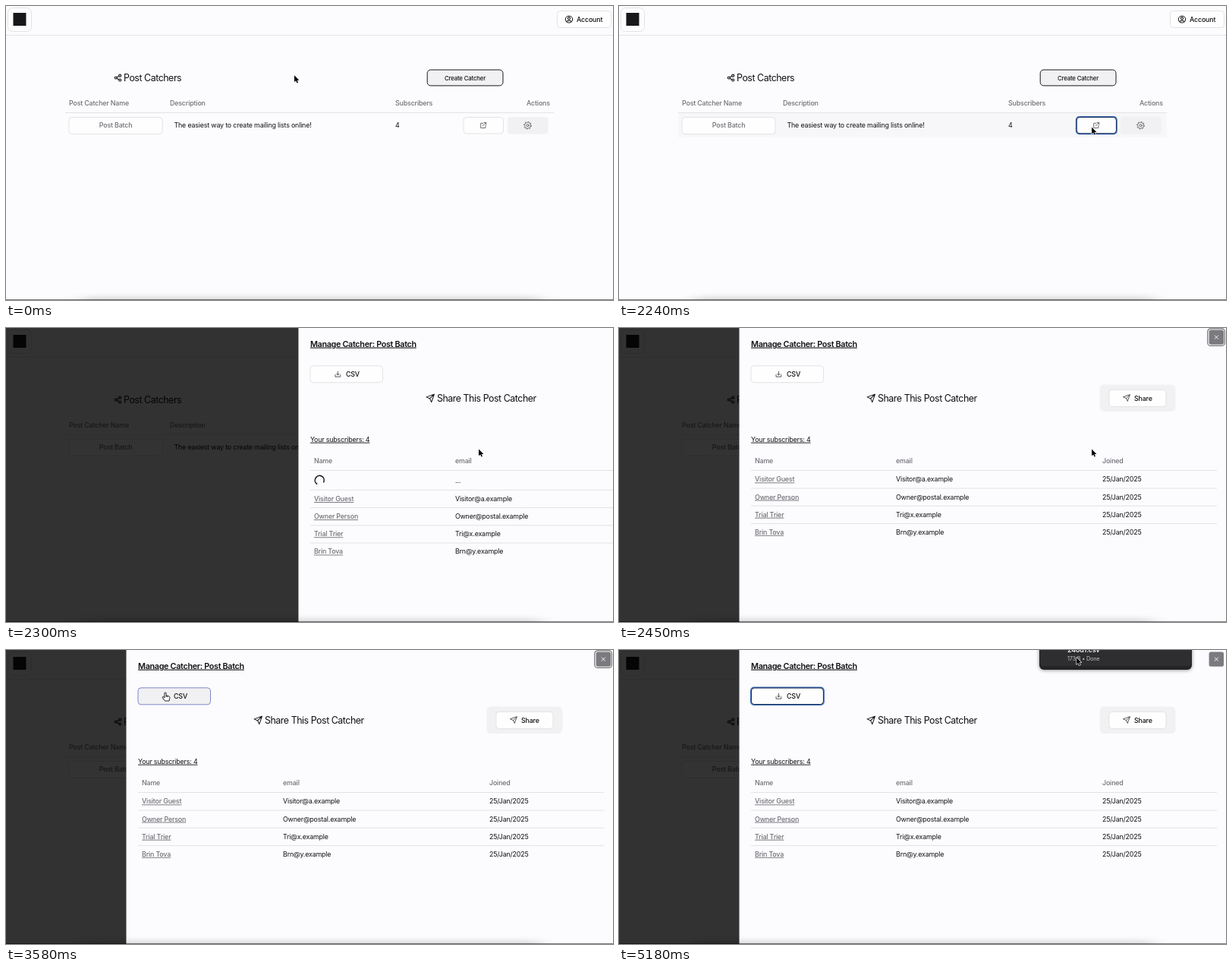
Write an HTML page that moves like this. It is 800 by 387 pixels and loops after 5210 ms.

```html
<!DOCTYPE html>
<html lang="en">
<head>
<meta charset="utf-8">
<title>Mailing list dashboard</title>
<style>
  html, body { margin: 0; width: 100%; height: 100%; overflow: hidden; background: #fcfbfd; }
  svg { display: block; width: 100%; height: 100%; }
  text { font: 440 8.9px Inter, "Noto Sans", sans-serif; letter-spacing: -.02em; fill: #111113; white-space: pre; }
  .m { font-weight: 500; }
  .g { font-weight: 500; fill: #6f6f76; }
  .u { text-decoration: underline; }
  .h { font-size: 12.4px; letter-spacing: -.037em; }
  .t { font-size: 10.8px; font-weight: 600; letter-spacing: -.03em; }
  .s { font-size: 7.8px; font-weight: 500; }
  .c { text-anchor: middle; }
  .file { font-size: 8.8px; font-weight: 600; fill: #f2f2f4; }
  .size { font-size: 7.2px; fill: #c4c4c9; }
  .i { fill: none; stroke: #18181b; stroke-linecap: round; stroke-linejoin: round; }
</style>
</head>
<body>
<svg id="stage" viewBox="0 0 800 387"></svg>
<script>
const LOOP = 5210, SHEET_X = 158.5, SHEET_W = 641.5;
const LINE = '#e3e2e6', PAGE = '#fcfbfd', SOFT = '#f1f0f2';

const text = (x, y, str, cls = '') => `<text x="${x}" y="${y}" class="${cls}">${str}</text>`;
const box = (x, y, w, h, fill, stroke = 'none', extra = '') =>
  `<rect x="${x}" y="${y}" width="${w}" height="${h}" rx="4" fill="${fill}" stroke="${stroke}" ${extra}/>`;
const rule = (x1, x2, y) => `<path d="M${x1} ${y}H${x2}" stroke="${LINE}"/>`;
const icon = (x, y, k, d, w = 2, color = '#18181b') =>
  `<path class="i" transform="translate(${x} ${y}) scale(${k})" d="${d}" stroke-width="${w}" style="stroke:${color}"/>`;
const ring = (id, x, y, w, h) => `<g id="${id}" fill="none">
  ${box(x - .5, y - .5, w + 1, h + 1, 'none', '#3a6cb8', 'stroke-width="1.4"')}
  ${box(x + .2, y + .2, w - .4, h - .4, 'none', '#14294f')}</g>`;

const PLANE = 'M22 2L15 22L11 13L2 9ZM22 2L11 13';
const EXPORT = 'M12 3V15M7.5 10.5L12 15L16.5 10.5M3.5 14V20.5H20.5V14';
const OPEN = 'M19 13V20.5H3.5V5H11M14 3H21V10M21 3L10 14';

function gear(cx, cy) {
  const pts = [];
  for (let k = 0; k < 32; k++) {
    const r = k % 4 < 2 ? 4.9 : 3.6, a = (k + .5) * Math.PI / 16;
    pts.push((cx + r * Math.cos(a)).toFixed(2) + ',' + (cy + r * Math.sin(a)).toFixed(2));
  }
  return `<g class="i" stroke-width=".8" style="stroke:#4c4c52"><polygon points="${pts.join(' ')}"/>
    <circle cx="${cx}" cy="${cy}" r="1.5"/></g>`;
}

const page = `
  ${box(2.5, 2.5, 31, 31, '#fdfdfe', LINE, 'style="rx:6px"')}
  <rect x="9.5" y="9" width="17" height="17" fill="#18181b"/>
  <path d="M0 38.5H800" stroke="${LINE}"/>
  ${box(726.5, 6.5, 71, 22, '#fefefe', LINE)}
  <g class="i" stroke-width="1.05"><circle cx="742" cy="17.5" r="4.6"/><circle cx="742" cy="16.2" r="1.6"/>
    <path d="M739 20.6C740 18.6 744 18.6 745 20.6"/></g>
  ${text(752, 20.7, 'Account', 'm')}
  <g class="i" stroke-width="1.2"><path d="M146 93.8L149 92.3M146 95.2L149 96.9"/>
    <circle cx="144.8" cy="94.5" r="1.5"/><circle cx="150.2" cy="91.7" r="1.5"/><circle cx="150.2" cy="97.5" r="1.5"/></g>
  ${text(155, 99.2, 'Post Catchers', 'h')}
  ${box(555.2, 84, 99.8, 20.9, SOFT, '#18181b', 'style="rx:4.5px"')}
  ${text(605, 97.5, 'Create Catcher', 's c')}
  ${text(83, 131, 'Post Catcher Name', 'g')}${text(216, 131, 'Description', 'g')}
  ${text(513, 131, 'Subscribers', 'g')}${text(686, 131, 'Actions', 'g')}
  <rect id="row" x="78" y="140" width="644" height="33" fill="#f7f6f8"/>
  ${rule(78, 722, 140.5)}
  ${box(83, 146.5, 123, 22, '#fefefe', LINE)}
  ${text(144.6, 160.3, 'Post Batch', 'g c')}
  ${text(221.5, 160.3, 'The easiest way to create mailing lists online!')}
  ${text(513, 160.3, '4')}
  ${box(603, 146.5, 52.5, 21.5, '#fefefe', LINE)}
  ${icon(624.3, 152.3, .4, OPEN, 2, '#4c4c52')}
  ${ring('openRing', 603, 146.2, 52.6, 21.8)}
  ${box(661, 146, 53.5, 22.5, SOFT)}
  ${gear(687.5, 157.2)}`;

const people = [
  ['Visitor Guest', 'Visitor@a.example'],
  ['Owner Person', 'Owner@postal.example'],
  ['Trial Trier', 'Tri@x.example'],
  ['Brin Tova', 'Brn@y.example']
];
const rows = people.map(([name, mail], k) => {
  const y = 202.4 + k * 23.15;
  return text(179, y, name, 'g u') + text(365, y, mail) + text(637, y, '25/Jan/2025') +
    (k < 3 ? rule(174, 788, 211 + k * 23.2) : '');
}).join('');

const sheet = `
  <rect x="${SHEET_X}" width="${SHEET_W}" height="387" fill="${PAGE}"/>
  ${text(174, 24.6, 'Manage Catcher: Post Batch', 't u')}
  ${box(174, 49.8, 95.5, 22, '#fefefe', LINE, 'id="csv"')}
  ${icon(205.6, 56, .4, EXPORT, 2, '#333338')}
  ${text(221, 63.9, 'CSV', 'm')}
  ${ring('csvRing', 174.2, 49.8, 95.4, 22)}
  ${icon(326, 86.2, .52, PLANE)}
  ${text(341, 97, 'Share This Post Catcher', 'h')}
  ${box(633.5, 74.5, 100, 35.5, SOFT, 'none', 'style="rx:6px"')}
  ${box(646, 81.3, 75, 22.3, '#fefefe', LINE)}
  ${icon(664, 87.2, .42, PLANE, 1.9, '#333338')}
  ${text(679, 95.5, 'Share', 'm')}
  ${text(174, 149.7, 'Your subscribers: 4', 'u')}
  ${text(179, 178.3, 'Name', 'g')}${text(365, 178.3, 'email', 'g')}${text(637, 178.3, 'Joined', 'g')}
  ${rule(174, 788, 187.5)}
  <g id="loading"><path id="spin" class="i" stroke-width="1.6" d="M-3.5 4.9A6 6 0 1 1 5.6 2.2"/>
    ${text(365, 203.8, '...')}${rule(174, 788, 213.3)}</g>
  <g id="rows">${rows}</g>
  ${box(775.8, .8, 22.6, 22.6, '#fefefe', '#6f6f74', 'id="closeRing" stroke-width="1.2"')}
  ${box(777.6, 2.4, 19.4, 19.4, '#7b7a7e', 'none', 'style="rx:2.5px"')}
  <path class="i" d="M785.2 9.9L789.6 14.3M789.6 9.9L785.2 14.3" style="stroke:#f6f6f8"/>`;

const popup = `
  <rect x="554" y="-20" width="201" height="46.5" rx="6" fill="#000" opacity=".45" filter="url(#soft)"/>
  <rect x="554" y="-20" width="201" height="46" rx="6" fill="#242426"/>
  <rect x="555" y="-20" width="199" height="41" rx="4" fill="#2e2e30"/>
  ${text(591, 3.4, '246d1.csv', 'file')}${text(591, 14.2, '173 B • Done', 'size')}`;

const stage = document.getElementById('stage');
stage.innerHTML = `
  <defs><filter id="soft" x="-20%" y="-100%" width="140%" height="300%"><feGaussianBlur stdDeviation="2.5"/></filter>
  <filter id="wide" x="-10%" y="-300%" width="120%" height="700%"><feGaussianBlur stdDeviation="12 4"/></filter></defs>
  <rect width="800" height="387" fill="${PAGE}"/>${page}
  <rect id="shade" width="800" height="387" fill="#000"/>
  <g id="sheet">${sheet}</g>
  <rect x="100" y="384" width="605" height="10" fill="#000" opacity=".17" filter="url(#wide)"/>
  <rect y="386" width="800" height="1" fill="#000" opacity=".5"/>
  <g id="popup">${popup}</g>
  <g id="cursor" stroke-linejoin="round">
    <path id="arrow" d="M0 0V8.8L2.1 6.9L3.5 10.1L5 9.4L3.6 6.4H6.4Z" fill="#000" stroke="#fff" stroke-width="1.2" paint-order="stroke"/>
    <path id="hand" d="M-1.1 .9C-1.1 -.4 1.1 -.4 1.1 .9V4L4.6 4.8C5.8 5.2 6 6 5.8 7.2L5 11H-.6L-3.6 7C-4.4 5.8 -3 5 -2 6L-1.1 7ZM1.1 4V6M3 4.5V6.2" fill="#fff" stroke="#111" stroke-width=".9"/>
  </g>`;

const el = {};
stage.querySelectorAll('[id]').forEach(n => el[n.id] = n);

// time, x, y of the pointer
const path = [
  [0, 380, 91.3], [630, 380, 91.3], [1090, 521, 170], [1170, 521, 170], [1270, 523, 155],
  [1420, 543, 121], [1560, 555, 142], [1700, 532, 155], [1780, 532, 155], [1910, 532, 143],
  [2050, 532, 143], [2200, 623, 159.5], [2548, 623, 159.5], [2582, 226, 68],
  [2780, 236, 38], [2950, 206, 48], [3120, 216, 60], [3250, 250, 34], [3370, 264, 88],
  [3470, 172, 66], [3580, 210, 56], [3700, 210, 56], [3880, 222, 61],
  [4910, 222, 61], [4970, 226, 68], [5175, 603, 10], [LOOP, 603, 10]
];

const clamp = v => Math.max(0, Math.min(1, v));
const span = (t, from, to) => clamp((t - from) / (to - from));
const smooth = p => p * p * (3 - 2 * p);
const inside = ([x, y], l, t, r, b) => x >= l && x <= r && y >= t && y <= b;
const show = (node, on) => node.style.display = on ? '' : 'none';

// y of cubic-bezier(.4, 0, .2, 1) at x
function glide(x) {
  let lo = 0, hi = 1;
  for (let k = 0; k < 20; k++) {
    const s = (lo + hi) / 2, q = 1 - s;
    if (1.2 * q * q * s + .6 * q * s * s + s ** 3 < x) lo = s; else hi = s;
  }
  return 3 * (1 - lo) * lo * lo + lo ** 3;
}

function pointer(t) {
  const k = Math.max(1, path.findIndex(p => p[0] > t));
  const [t0, x0, y0] = path[k - 1], [t1, x1, y1] = path[k];
  const p = smooth(span(t, t0, t1));
  return [x0 + (x1 - x0) * p, y0 + (y1 - y0) * p];
}

function draw(t) {
  const pos = pointer(t), opened = t >= 2270;
  const overCsv = t >= 2560 && inside(pos, 174, 49.5, 270, 72);

  show(el.row, !opened && inside(pos, 78, 140, 722, 173));
  show(el.openRing, t >= 2210 && !opened);

  // the sheet opens in steps of 30 ms
  const step = 2240 + Math.floor((t - 2240) / 30) * 30;
  show(el.shade, opened);
  el.shade.setAttribute('opacity', .8 * span(step, 2245, 2290));
  show(el.sheet, opened);
  const slide = SHEET_W * (1 - glide(span(step, 2250, 2370)));
  el.sheet.setAttribute('transform', `translate(${slide.toFixed(2)} 0)`);

  const loading = t < 2420;
  show(el.loading, loading);
  el.rows.setAttribute('transform', `translate(0 ${loading ? 25.6 : 0})`);
  el.spin.setAttribute('transform', `translate(186.3 200.4) rotate(${(t - 2300) * .36})`);

  const focused = t >= 4030;
  show(el.closeRing, !focused);
  show(el.csvRing, focused);
  el.csv.setAttribute('fill', overCsv ? SOFT : '#fefefe');
  el.csv.setAttribute('stroke', overCsv ? '#8088cc' : LINE);

  show(el.popup, t >= 4390);
  el.popup.setAttribute('transform', `translate(0 ${(-32 * (1 - smooth(span(t, 4380, 4620)))).toFixed(2)})`);

  show(el.hand, overCsv);
  show(el.arrow, !overCsv);
  el.cursor.setAttribute('transform', `translate(${pos[0].toFixed(2)} ${pos[1].toFixed(2)})`);
}

const start = performance.now();
function tick() {
  draw((performance.now() - start) % LOOP);
  requestAnimationFrame(tick);
}
draw(0);
requestAnimationFrame(tick);
</script>
</body>
</html>
```
